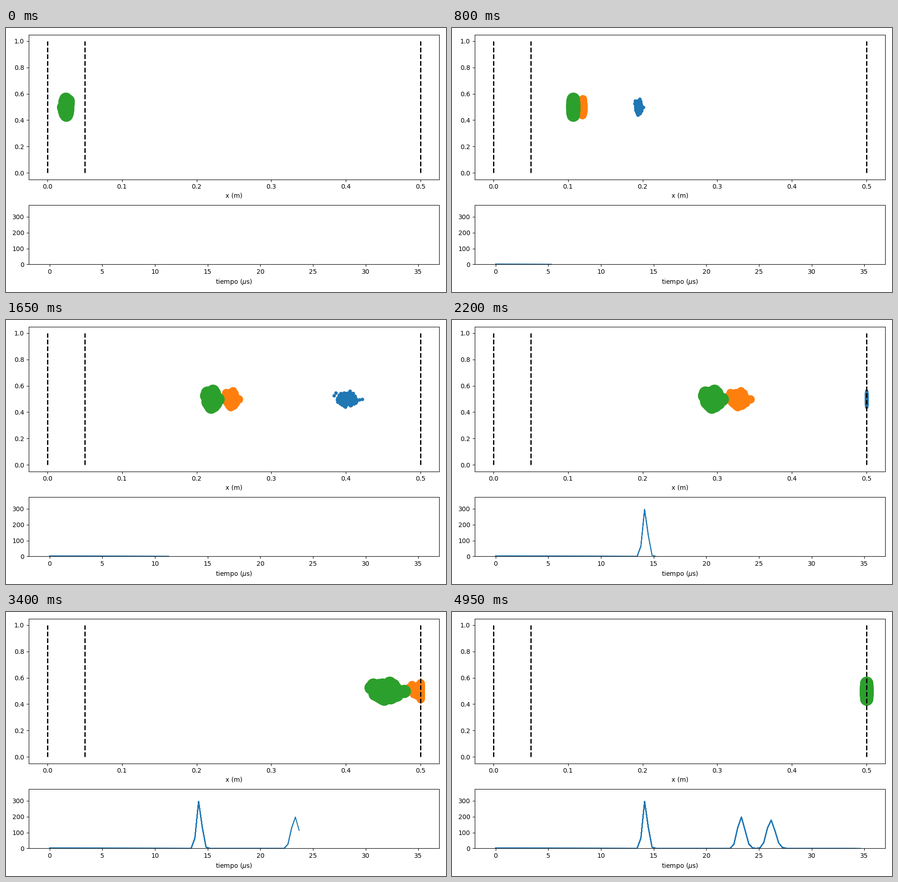
Animation, 966 px wide and 580 px high, one loop 5000 ms. Source, as a matplotlib script:

```python
import math
import numpy as np
import matplotlib.pyplot as plt
from matplotlib.animation import FuncAnimation

W, H, DPI = 966, 580, 100
FRAMES = 100
INTERVAL = 50
N = 500
GATE, DETECTOR = 0.05, 0.5
DRIFT = DETECTOR - GATE
START = 0.025                      # mean distance from the gate
SPREAD_X, SPREAD_Y = 0.0009, 0.0195
DELAY = 0.45                       # detector delay in steps

FLIGHTS = [41.1, 66.9, 74.9]       # mean flight times in steps
SIZES = [20, 150, 400]             # marker areas

# outermost ions: left, right, top, bottom
TIPS = [(0.0215, 0.4985), (0.0222, 0.494), (0.0278, 0.526),
        (0.0274, 0.547), (0.0244, 0.559), (0.0254, 0.441)]


def make_cloud():
    """Gaussian cloud of ions, cut to an ellipse, plus its tips."""
    rng = np.random.default_rng(4)
    p = rng.normal((START, 0.5), (SPREAD_X, SPREAD_Y), (3 * N, 2))
    r = np.hypot((p[:, 0] - START) / 0.0024, (p[:, 1] - 0.5) / 0.057)
    return np.vstack([p[r < 1][:N - len(TIPS)], TIPS])


def path_time(d):
    """Flight time, up to a factor, of an ion that starts d before the gate."""
    return 2 * math.sqrt(d) + DRIFT / math.sqrt(d)


def fly(x0, flight, step):
    """Constant acceleration up to the gate, then free drift to the detector."""
    d = GATE - x0
    k = path_time(START) / flight
    t_gate = 2 * np.sqrt(d) / k
    inside = x0 + (k * step) ** 2 / 4
    drift = GATE + k * np.sqrt(d) * (step - t_gate)
    return np.minimum(np.where(step < t_gate, inside, drift), DETECTOR)


def arrived(flight, step):
    """Expected number of ions at the detector by the given step."""
    tau = path_time(START) * (step + DELAY) / flight
    root = tau ** 2 - 8 * DRIFT
    if root < 0:
        return 0
    d = ((tau - math.sqrt(root)) / 4) ** 2
    return N / 2 * math.erfc((d - START) / (SPREAD_X * math.sqrt(2)))


def add_panel(top, bottom):
    """Axes between two heights, in pixels from the top of the stage."""
    left, right = 49.6, 951.4
    return fig.add_axes([left / W, 1 - bottom / H,
                         (right - left) / W, (bottom - top) / H])


cloud = make_cloud()
time = np.linspace(0, 35, FRAMES)
signal = np.array([sum(round(arrived(f, i + 1) - arrived(f, i))
                       for f in FLIGHTS) for i in range(FRAMES)])

fig = plt.figure(figsize=(W / DPI, H / DPI), dpi=DPI)
tube = add_panel(14.5, 332.5)
chart = add_panel(388.6, 519.4)

for x in (0, GATE, DETECTOR):
    tube.plot([x, x], [0, 1], "k--", lw=2)
tube.set(xlim=(-0.025, 0.525), ylim=(-0.05, 1.05), xlabel="x (m)")
chart.set(xlim=(-2, 37), ylim=(0, 375), xlabel=r"tiempo ($\mu$s)")

packets = [tube.scatter(cloud[:, 0], cloud[:, 1], s=size, color=f"C{i}")
           for i, size in enumerate(SIZES)]
# every step draws its trace over the earlier ones
traces = [chart.plot(time[:i], signal[:i], color="C0", visible=False)[0]
          for i in range(FRAMES)]


def update(step):
    for packet, flight in zip(packets, FLIGHTS):
        x = fly(cloud[:, 0], flight, step)
        packet.set_offsets(np.column_stack([x, cloud[:, 1]]))
    for i, trace in enumerate(traces):
        trace.set_visible(i <= step)
    return packets + traces


anim = FuncAnimation(fig, update, frames=FRAMES, interval=INTERVAL,
                     repeat=True, repeat_delay=0)
plt.show()
```
